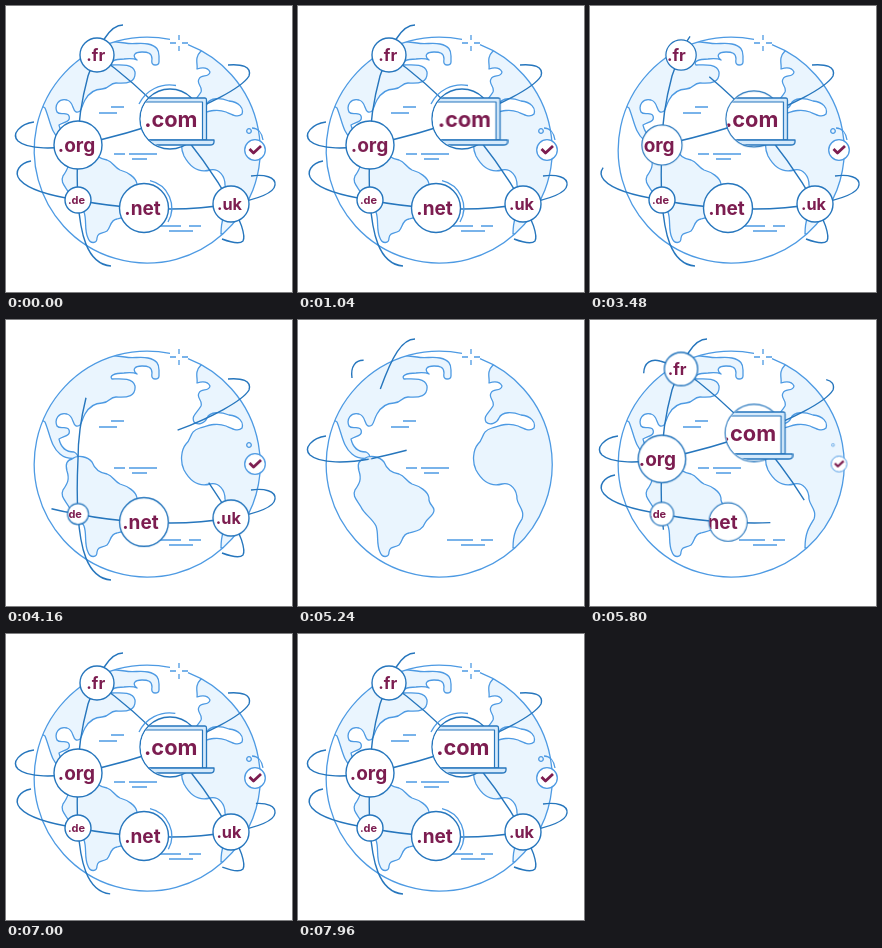
Animation, 286 px wide and 286 px high, one loop 8000 ms. Source, as an HTML page:

```html
<!DOCTYPE html>
<html lang="en">
<head>
<meta charset="utf-8">
<title>Domain globe</title>
<style>
html, body { margin: 0; width: 100%; height: 100%; overflow: hidden; background: #fff; }
svg { display: block; width: 286px; height: 286px; }
path, circle { fill: none; stroke-linejoin: round; }
.globe { stroke: #4d9ae3; stroke-width: 1.3; }
.land path { fill: #eaf5fe; }
.orbit { stroke: #2676bd; stroke-width: 1.4; }
.disc { fill: #fff; stroke: #2676bd; stroke-width: 1.4; }
.frame { fill: #d6eafb; stroke: #2676bd; stroke-width: 1.3; }
.screen { fill: #fff; stroke: #2676bd; stroke-width: 1.2; }
#badge circle { fill: #fff; }
.tick { stroke: #7c1d50; stroke-width: 2.8; }
text { font-family: Inter, "Open Sans", sans-serif; font-weight: 700; fill: #7c1d50; text-anchor: middle; }
</style>
</head>
<body>
<svg viewBox="0 0 286 286">
  <defs>
    <clipPath id="world"><circle cx="141" cy="144" r="113"/></clipPath>
  </defs>
  <g class="globe">
    <g class="land" clip-path="url(#world)">
      <path d="M119 37C128 39 133 36 142 38C151 40 153 44 153 50V56Q153 59 149 59Q145 59 146 53C146 47 142 46 136 46C128 46 126 50 131 54Q127 52 118 53C108 53 103 56 106 59C112 59 127 57 129 66C130 76 122 78 110 77C103 77 104 83 96 83C88 83 83 87 79 94C75 101 76 107 70 106C66 104 68 96 61 94C53 92 48 99 51 106C54 110 61 105 63 110C65 116 58 116 53 119C55 128 60 132 68 132Q72 134 72 138Q61 140 54 134C45 127 44 114 39 102L20 90L60 30Z"/>
      <path d="M66 139C72 134 82 137 86 142C89 150 94 153 101 154C107 156 108 161 114 164C121 166 130 171 131 178C130 184 136 186 136 190C136 196 129 198 127 203C124 211 118 211 111 213C104 214 105 221 101 225C96 228 92 226 91 232C91 238 84 238 82 232C78 224 81 214 78 206C74 198 66 194 63 187C59 180 54 176 57 170C61 164 64 160 61 151C59 144 61 140 66 139Z"/>
      <path d="M195 45C188 52 192 58 191 63C197 61 202 62 204 66C203 72 195 68 193 73C190 78 197 80 195 86C191 93 185 96 188 102C192 106 199 103 201 98C204 91 215 92 223 95C233 96 238 102 236 108C232 112 227 109 220 106C210 102 201 106 194 108C183 111 186 119 180 124C175 130 174 142 178 150C184 161 193 167 204 164C213 162 219 170 219 179C220 186 227 190 224 199C219 207 215 213 215 228L275 228V30Z"/>
    </g>
    <path d="M164 33.4A113 113 0 1 0 182 38.7"/>
    <path d="M173 29V34M173 40V45M164 37H170M176 37H182"/>
    <path d="M105 101H118M93 107H111M108 148H119M123 148H151M126 153H141M149 220H175M183 220H195M163 225H187"/>
  </g>
  <g class="orbit">
    <path id="side" d="M28 116C14 118 5 128 12 135C22 144 50 143 72 139C104 132 134 124 164 113C200 100 236 82 243 70C246 60 235 58 222 59"/>
    <path id="tall" d="M117 19C104 19 94 36 82 70C74 100 72 120 72 139C71 160 71 180 72 194C74 225 80 258 105 260"/>
    <path id="curl" d="M54 58C52 44 60 38 70 41C78 43 85 46 91 49"/>
    <path id="slant" d="M91 49C118 68 142 90 164 113C186 138 208 168 225 198C234 212 240 230 237 235C233 239 224 236 216 233"/>
    <path id="low" d="M25 155C14 157 7 166 14 174C22 183 45 190 72 194C95 199 115 201 138 202C165 204 195 203 225 198C248 194 268 188 269 179C270 171 258 168 245 170"/>
  </g>
  <g class="globe">
    <path id="comHalo" d="M133 98A34 34 0 0 1 170 79.5"/>
    <path id="netHalo" d="M144 174.7A28 28 0 0 1 162 216"/>
  </g>
  <g id="nodes"></g>
  <g class="globe">
    <path id="hook" d="M246 122C252 122 256 127 257 134"/>
    <g transform="translate(243 125)"><circle id="bead" r="2.3"/></g>
    <g transform="translate(249 144)"><g id="badge">
      <circle r="10.3"/>
      <path class="tick" d="M-5.5 -1L-1.5 3L6 -4"/>
    </g></g>
  </g>
</svg>
<script>
const LOOP = 8000;
const OUT = 'cubic-bezier(.25,1,.5,1)';
const QUAD = 'cubic-bezier(.11,0,.5,0)';
const CUBIC = 'cubic-bezier(.32,0,.67,0)';
const QUART = 'cubic-bezier(.5,0,.75,0)';
const QUINT = 'cubic-bezier(.64,0,.78,0)';
const EXPO = 'cubic-bezier(.7,0,.84,0)';
const byId = id => document.getElementById(id);

// Keys are [ms, value, easing to the next key].
function play(el, prop, keys) {
  el.animate(keys.map(([ms, value, easing = 'linear']) =>
    ({ offset: ms / LOOP, [prop]: value, easing })),
    { duration: LOOP, iterations: Infinity });
}

function make(tag, attrs, parent) {
  const el = document.createElementNS('http://www.w3.org/2000/svg', tag);
  for (const name in attrs) el.setAttribute(name, attrs[name]);
  parent.append(el);
  return el;
}

// A line grows from its start and is later wiped in the same direction.
function trace(id, [wipe, gone, ease], [draw, done]) {
  const el = byId(id);
  el.setAttribute('pathLength', 1);
  el.style.strokeDasharray = '1 3';
  const wiping = [[wipe, 0, ease], [gone, -1.01]];
  const drawing = [[draw, 1.01, OUT], [done, 0]];
  play(el, 'strokeDashoffset', wipe < draw
    ? [[0, 0], ...wiping, [gone, 1.01], ...drawing, [LOOP, 0]]
    : [[0, 1.01], ...drawing, ...wiping, [LOOP, -1.01]]);
}

function pop(el, leave, enter) {
  play(el, 'transform', [
    [0, 'scale(1)'], [leave, 'scale(1)', CUBIC], [leave + 700, 'scale(0)'],
    [enter, 'scale(0)', OUT], [enter + 800, 'scale(1)'], [LOOP, 'scale(1)']
  ]);
}

function slide(el, leave, enter, far, drift) {
  const keys = [[0, 0], [2040, drift], [leave - 300, drift, QUAD],
    [leave + 700, -far], [enter, -far, OUT], [enter + 2000, 0], [LOOP, 0]];
  play(el, 'transform', keys.map(([ms, x, ease]) => [ms, `translateX(${x}px)`, ease]));
}

trace('side', [900, 4700, CUBIC], [5070, 6400]);
trace('tall', [1000, 4900, EXPO], [5080, 7480]);
trace('curl', [5700, 6800], [5160, 5700]);
trace('slant', [2000, 4450, QUART], [5300, 7300]);
trace('low', [1800, 5080, QUINT], [5250, 7850]);
for (const id of ['comHalo', 'netHalo']) trace(id, [2500, 3300], [6400, 7300]);
trace('hook', [3500, 4000], [6400, 7200]);

const nodes = [
  { label: '.fr', x: 91, y: 49, r: 17, size: 16.5, dx: -1.3, leave: 3150, enter: 5290 },
  { label: '.org', x: 72, y: 139, r: 24, size: 19, dx: -1.5, leave: 3100, enter: 5230, drift: 2 },
  { label: '.com', x: 164, y: 113, r: 30, size: 21.8, dx: .8, leave: 3200, enter: 5360, drift: 3 },
  { label: '.de', x: 72, y: 194, r: 13, size: 11, dx: -1.5, leave: 3760, enter: 5450 },
  { label: '.net', x: 138, y: 202, r: 24.5, size: 19, dx: -1.5, leave: 4050, enter: 5550 },
  { label: '.uk', x: 225, y: 198, r: 18, size: 16.3, dx: -1.5, leave: 4100, enter: 6000 }
];

// Contents keep their size while the clip grows and shrinks with the disc.
function clipped(id, d, node, leave, enter) {
  const clip = make('clipPath', { id }, node);
  pop(make('path', { d }, clip), leave, enter);
  return make('g', { 'clip-path': `url(#${id})` }, node);
}

for (const { label, x, y, r, size, dx, leave, enter, drift = 0 } of nodes) {
  const id = label.slice(1);
  const node = make('g', { transform: `translate(${x} ${y})` }, byId('nodes'));
  pop(make('circle', { class: 'disc', r }, node), leave, enter);
  const c = r - .7;
  const left = `M0 ${-c}A${c} ${c} 0 0 0 0 ${c}`;

  if (id === 'com') {
    const view = clipped('open', `${left}H60V${-c}Z`, node, leave, enter);
    const laptop = make('g', {}, view);
    make('path', { class: 'frame', d: 'M-40 -21H35Q36.5 -21 36.5 -19V21H-40' }, laptop);
    make('path', { class: 'screen', d: 'M-40 -17H32.5V21H-40' }, laptop);
    make('path', { class: 'frame', d: 'M-40 21H44V23Q44 26 40 26H-40' }, laptop);
    slide(laptop, leave, enter, r / 2, drift);
  }

  const view = clipped(id, `${left}A${c} ${c} 0 0 0 0 ${-c}`, node, leave, enter);
  const text = make('text', { x: dx, y: size * .36, 'font-size': size }, view);
  text.textContent = label;
  slide(text, leave, enter, r / 2, drift);
}

pop(byId('badge'), 4100, 5560);
pop(byId('bead'), 4100, 5640);
</script>
</body>
</html>
```
